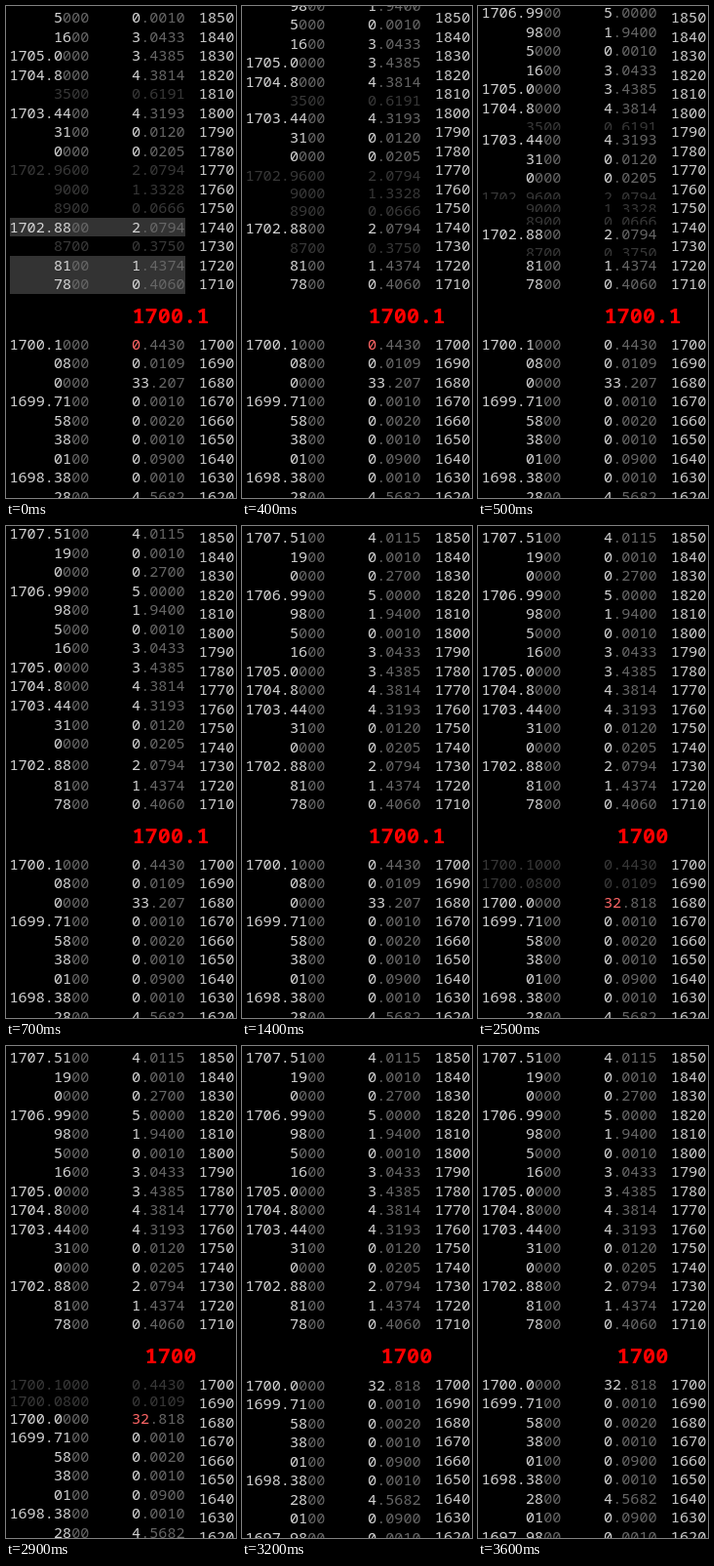
Recreate the animation shown at these times as an HTML page. Size 236 by 504 pixels, loop 3.7 s.

```html
<!DOCTYPE html>
<html lang="en">
<head>
<meta charset="utf-8">
<title>Order book</title>
<style>
html, body { margin: 0; width: 100%; height: 100%; overflow: hidden; background: #000; }
#book {
  position: relative; width: 236px; height: 504px; overflow: hidden;
  font: 15.2px/19.5px "Noto Sans Mono", "DejaVu Sans Mono", monospace;
  color: #666; white-space: pre;
}
.list { position: absolute; left: 0; width: 236px; }
#asks, #askDepth { bottom: 209.25px; }
#bids, #bidDepth { top: 336.75px; }
.row { position: relative; height: 19.5px; margin-left: 4px; width: 180px; overflow: hidden; }
.row div { position: absolute; top: 0; }
.price { right: 98.6px; }
.amount { left: 125px; }
b { font-weight: 400; color: #d4d4d4; }
.flash { background: #333; }
.gone, .gone b { color: #383838; }
.hit .amount b { color: #f66; }
.depth { color: #ccc; padding-left: 197.8px; height: 19.5px; }
#last {
  position: absolute; left: 69px; width: 200px; top: 302px; text-align: center;
  font-weight: 900; font-size: 22px; line-height: 28px; color: #f00;
}
</style>
</head>
<body>
<div id="book">
  <div class="list" id="askDepth"></div>
  <div class="list" id="bidDepth"></div>
  <div class="list" id="asks"></div>
  <div class="list" id="bids"></div>
  <div id="last">1700.1</div>
</div>
<script>
const LOOP = 3700, STEP = 100, ROW = 19.5;
const FLASH_END = 300, HIT_END = 450, TRADE = 1750, HIT2_END = 2950;
const SLIDE = 430, SLIDE1 = 327, SLIDE2 = 2812;

const $ = id => document.getElementById(id);

// Marks: "-" row to remove, "*" freshly added row
const asks = `1707.5100 4.0115
1900 0.0010
0000 0.2700
1706.9900 5.0000
9800 1.9400
5000 0.0010
1600 3.0433
1705.0000 3.4385
1704.8000 4.3814
3500 0.6191 -
1703.4400 4.3193
3100 0.0120
0000 0.0205
1702.9600 2.0794 -
9000 1.3328 -
8900 0.0666 -
1702.8800 2.0794 *
8700 0.3750 -
8100 1.4374 *
7800 0.4060 *`;

const bids = `1700.1000 0.4430 -
0800 0.0109 -
0000 33.207
1699.7100 0.0010
5800 0.0020
3800 0.0010
0100 0.0900
1698.3800 0.0010
2800 4.5682
0100 0.0900
1697.9800 0.0010`;

// Bright significant digits, grey trailing zeros
const priceHtml = p => p.replace(/^((?:\d+\.)?\d\d*?)(0*)$/, "<b>$1</b>$2");
const amountHtml = a => a.replace(/^\d+/, "<b>$&</b>");

function addRows(list, text) {
  return text.split("\n").map(line => {
    const [price, amount, mark] = line.split(" ");
    const el = document.createElement("div");
    el.className = "row";
    el.innerHTML = `<div class="price">${priceHtml(price)}</div>` +
      `<div class="amount">${amountHtml(amount)}</div>`;
    list.append(el);
    return { el, price, amount, mark };
  });
}

function addDepth(list, from, to) {
  for (let v = from; v >= to; v -= 10) {
    const el = document.createElement("div");
    el.className = "depth";
    el.textContent = v;
    list.append(el);
  }
}

const askRows = addRows($("asks"), asks);
const bidRows = addRows($("bids"), bids);
addDepth($("askDepth"), 1850, 1710);
addDepth($("bidDepth"), 1700, 1620);

function slideHeight(t, start) {
  const x = Math.min(1, Math.max(0, (t - start) / SLIDE));
  return ROW * (0.5 + 0.5 * Math.cos(Math.PI * x));
}

function collapse(rows, height) {
  for (const r of rows) if (r.mark === "-") r.el.style.height = height + "px";
}

for (const r of askRows) r.el.classList.toggle("gone", r.mark === "-");

let traded = null;
function setTraded(on) {
  if (on === traded) return;
  traded = on;
  $("last").textContent = on ? "1700" : "1700.1";
  bidRows.slice(0, 3).forEach((r, i) => {
    const full = on && i ? "1700." + r.price : r.price;
    r.el.children[0].innerHTML = priceHtml(full);
    r.el.classList.toggle("gone", on && r.mark === "-");
  });
  bidRows[2].el.children[1].innerHTML = amountHtml(on ? "32.818" : bidRows[2].amount);
}

function draw(t) {
  for (const r of askRows) r.el.classList.toggle("flash", r.mark === "*" && t < FLASH_END);
  setTraded(t >= TRADE);
  bidRows[0].el.classList.toggle("hit", t < HIT_END);
  bidRows[2].el.classList.toggle("hit", t >= TRADE && t < HIT2_END);
  collapse(askRows, slideHeight(t, SLIDE1));
  collapse(bidRows, slideHeight(t, SLIDE2));
}

const begin = performance.now();
function tick() {
  const t = (performance.now() - begin + 5) % LOOP;
  draw(Math.floor(t / STEP) * STEP);
  requestAnimationFrame(tick);
}
tick();
</script>
</body>
</html>
```
